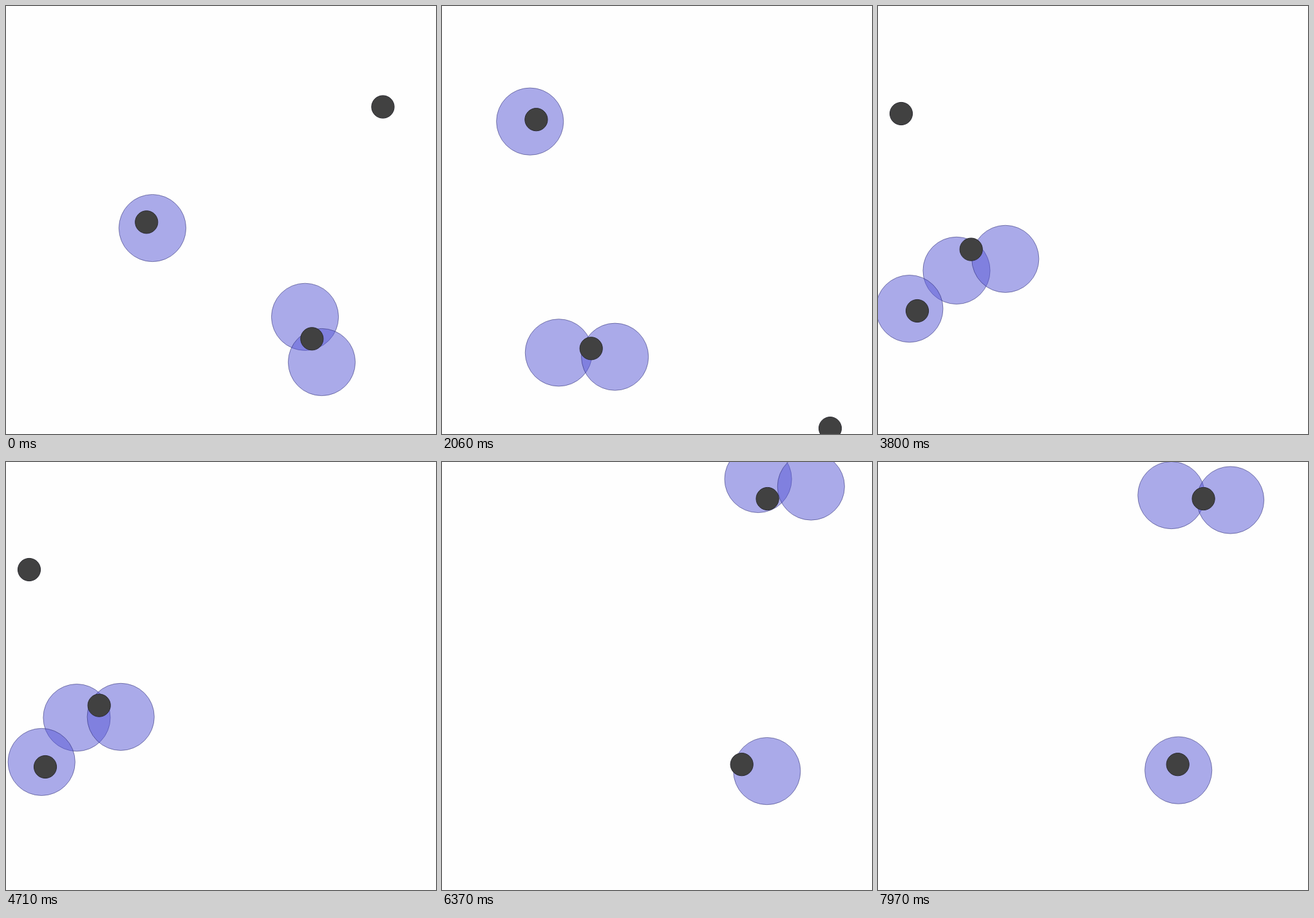
An HTML page with a canvas that plays this animation: 668x664 px, repeating every 8 s.

```html
<!DOCTYPE html>
<html lang="en">
<head>
<meta charset="utf-8">
<title>Circles chasing dots</title>
<style>
html, body { margin: 0; width: 100%; height: 100%; overflow: hidden; background: #fefefe; }
canvas { display: block; }
</style>
</head>
<body>
<canvas id="stage" width="668" height="664"></canvas>
<script>
const ctx = document.getElementById('stage').getContext('2d');
const LOOP = 8000;
const DAMPING = 0.005;
const SPRING_RATE = Math.PI / 480;
const SWAY_PERIOD = 1800;
const SWAY_PEAK = 950;

// Each scene moves the dots at once; every circle then springs to its
// goal [x, y] and hovers there along its sway [dx, dy].
const scenes = [
  {
    start: -SWAY_PEAK,
    dots: [[585.5, 156.5], [218.3, 335.3], [475.3, 516.3]],
    goals: [[227, 339.5], [464.5, 480.3], [493, 561]],
    sways: [[0.5, 5], [0, 2], [-2.5, -8.5]]
  },
  {
    start: 895,
    dots: [[603, 655.2], [146.4, 176.2], [231.7, 531.3]],
    goals: [[137.9, 178], [182, 538.7], [266.7, 549.4]],
    sways: [[-2, 1], [-2, -1], [1.8, -7.2]]
  },
  {
    start: 3170,
    dots: [[36, 167], [61, 473], [144.7, 377.6]],
    goals: [[116.6, 397.9], [55.3, 469.3], [190.1, 397.8]],
    sways: [[14, 3], [0, 8.2], [25, 4.9]]
  },
  {
    start: 5880,
    dots: [[505.6, 57], [465.7, 469.2]],
    goals: [[461.5, 57.8], [467.6, 479.4], [543.4, 68.7]],
    sways: [[8.6, 9.4], [1.4, 1.7], [-6.2, 14.5]]
  }
];

// Share of the way still to go: 1 at the start, overshoots, settles at 0.
function remaining(elapsed) {
  const angle = SPRING_RATE * elapsed;
  return Math.exp(-DAMPING * elapsed) * (Math.cos(angle) + DAMPING / SPRING_RATE * Math.sin(angle));
}

function circlePosition(circle, sceneIndex, t) {
  const { start, goals, sways } = scenes[sceneIndex];
  const elapsed = t - start;
  const swing = Math.cos(2 * Math.PI * (elapsed - SWAY_PEAK) / SWAY_PERIOD);
  const target = goals[circle].map((value, axis) => value + sways[circle][axis] * swing);
  if (sceneIndex === 0) return target;
  const from = circlePosition(circle, sceneIndex - 1, start);
  return target.map((value, axis) => value + (from[axis] - value) * remaining(elapsed));
}

function disc([x, y], radius, fill, stroke) {
  ctx.beginPath();
  ctx.arc(x, y, radius, 0, Math.PI * 2);
  ctx.fillStyle = fill;
  ctx.fill();
  ctx.strokeStyle = stroke;
  ctx.stroke();
}

function draw(now) {
  const t = now % LOOP;
  const sceneIndex = scenes.filter(scene => scene.start <= t).length - 1;
  ctx.fillStyle = '#fefefe';
  ctx.fillRect(0, 0, 668, 664);
  for (let circle = 0; circle < 3; circle++) {
    disc(circlePosition(circle, sceneIndex, t), 52.1, 'rgba(88, 88, 214, 0.5)', 'rgba(30, 30, 100, 0.5)');
  }
  for (const dot of scenes[sceneIndex].dots) disc(dot, 17.6, '#414141', '#2a2a30');
  requestAnimationFrame(() => draw(performance.now()));
}

draw(0);
</script>
</body>
</html>
```
